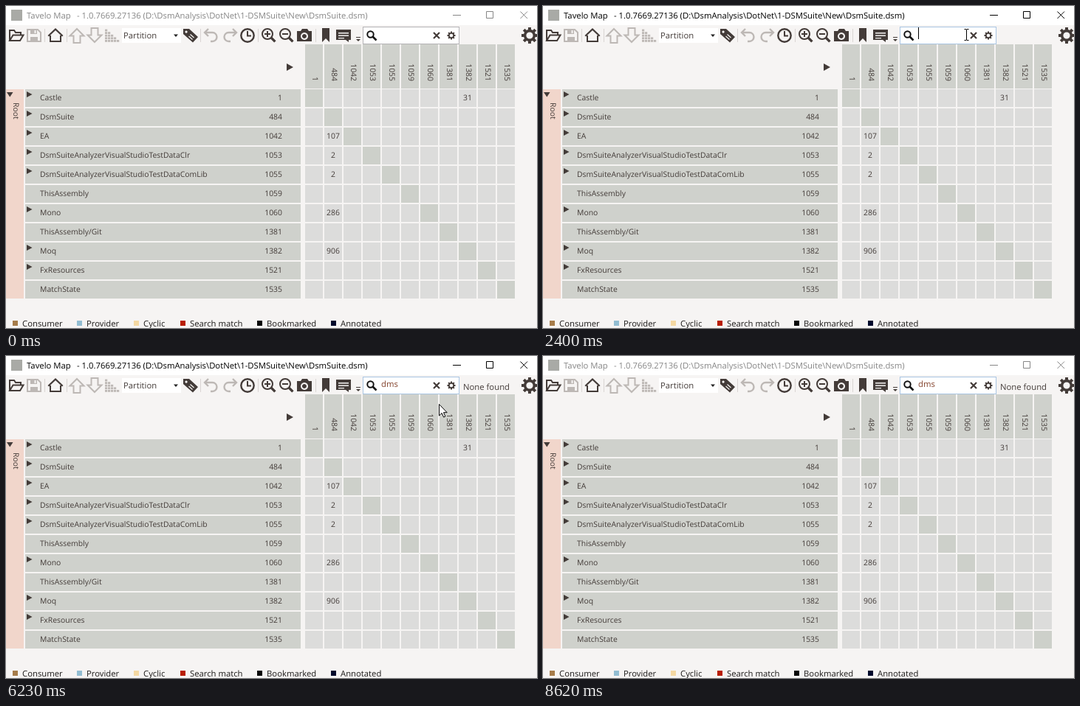
Animation of 719 by 437 pixels, one loop 8.78 s. Source, as an HTML page with a canvas:

```html
<!DOCTYPE html>
<html lang="en">
<head>
<meta charset="utf-8">
<title>Dependency matrix search</title>
<style>
html, body { margin: 0; width: 100%; height: 100%; overflow: hidden; background: #f6f4f3; }
canvas { display: block; }
</style>
</head>
<body>
<canvas id="stage" width="719" height="437"></canvas>
<script>
const ctx = document.getElementById('stage').getContext('2d');
ctx.textRendering = 'geometricPrecision';

const LOOP = 8780;
const INK = '#433b38', FADED = '#bdb8b5', BG = '#f6f4f3';
const BAND = '#cfd1cc', BAND_LIT = '#d9dbd5', CELL = '#dcdcdb', CELL_LIT = '#e4e4e2';
const DIAG = '#cdd0ca', DIAG_LIT = '#d5dad0';
const BIG = 11.3, SMALL = 10.4;
const PITCH = 26, SIZE = 24, LEFT = 405, TOP = 113;

// name, id, expandable
const rows = [
  ['Castle', 1, 1], ['DsmSuite', 484, 1], ['EA', 1042, 1],
  ['DsmSuiteAnalyzerVisualStudioTestDataClr', 1053, 1],
  ['DsmSuiteAnalyzerVisualStudioTestDataComLib', 1055, 1],
  ['ThisAssembly', 1059, 0], ['Mono', 1060, 1], ['ThisAssembly/Git', 1381, 0],
  ['Moq', 1382, 1], ['FxResources', 1521, 1], ['MatchState', 1535, 0]
];
// row, column, weight
const links = [[0, 8, 31], [2, 1, 107], [3, 1, 2], [4, 1, 2], [6, 1, 286], [8, 1, 906]];
const legend = [
  [9, 'Consumer', '#a67c4a'], [96, 'Provider', '#92bdd2'], [173, 'Cyclic', '#f4d8a2'],
  [236, 'Search match', '#b81d00'], [340, 'Bookmarked', '#080808'], [440, 'Annotated', '#000a2c']
];

// start, query, caret x, status, marked rows
const searches = [
  [0, '', 508, '', []],
  [2780, 'd', 515, '', []],
  [2870, 'd', 515, '1019 found', [0, 1, 2, 3, 4, 6, 8]],
  [3270, 'dm', 515, '8 found', [0, 6, 8]],
  [3340, 'dm', 525, '8 found', [0, 6, 8]],
  [3480, 'dms', 530, 'None found', []]
];
const caretFlips = [1390, 1940, 2400, 4050, 4510, 5060, 5610, 6140, 6690, 7230, 7690, 8240];

// Pointer moves: sampling step, end, keys of time, x, y
const moves = [
  { step: 75.7, end: 2780, keys: [
    [230, 662, 426], [420, 606, 300], [600, 535, 160], [760, 486, 67], [920, 490, 55],
    [1062, 503, 44], [1365, 523, 41], [1515, 523, 41], [1668, 573, 39]] },
  { step: 68.3, end: 6820, keys: [
    [6140, 573, 39], [6345, 611, 118], [6550, 671, 281], [6755, 679, 394]] }
];

function rect(x, y, w, h, color) {
  ctx.fillStyle = color;
  ctx.fillRect(x, y, w, h);
}

function text(str, x, y, size = BIG, color = INK, align = 'left') {
  ctx.font = `${size}px "Open Sans", "Noto Sans", sans-serif`;
  ctx.fillStyle = color;
  ctx.textAlign = align;
  ctx.fillText(str, x, y);
}

function turned(str, x, y, align) {
  ctx.save();
  ctx.translate(x, y);
  ctx.rotate(Math.PI / 2);
  text(str, 0, 0, SMALL, INK, align);
  ctx.restore();
}

function fill(d, color = INK, x = 0, y = 0) {
  ctx.save();
  ctx.translate(x, y);
  ctx.fillStyle = color;
  ctx.fill(new Path2D(d), 'evenodd');
  ctx.restore();
}

function line(d, color = INK, width = 2, x = 0, y = 0) {
  ctx.save();
  ctx.translate(x, y);
  ctx.strokeStyle = color;
  ctx.lineWidth = width;
  ctx.stroke(new Path2D(d));
  ctx.restore();
}

function ring(x, y, r, width, color = INK) {
  ctx.beginPath();
  ctx.arc(x, y, r, 0, 7);
  ctx.strokeStyle = color;
  ctx.lineWidth = width;
  ctx.stroke();
}

function gear(x, y, r) {
  ring(x, y, r * .58, r * .32);
  for (let i = 0; i < 8; i++) {
    ctx.save();
    ctx.translate(x, y);
    ctx.rotate(i * Math.PI / 4);
    rect(-r * .18, -r, r * .36, r * .35, INK);
    ctx.restore();
  }
}

function lens(x, y, r, sign) {
  ring(x, y, r, 2);
  line(`M${x + r * .7} ${y + r * .7}l5.5 5.5`, INK, 3.4);
  if (sign) line(`M${x - 4} ${y}h8`, INK, 2);
  if (sign === '+') line(`M${x} ${y - 4}v8`, INK, 2);
}

function titleBar(active) {
  const color = active ? '#000' : '#868686';
  rect(0, 0, 719, 26, '#fff');
  rect(7, 5, 15, 15, '#a9aaa6');
  text('Tavelo Map', 28, 17, BIG, color);
  text('- 1.0.7669.27136 (D:\\DsmAnalysis\\DotNet\\1-DSMSuite\\New\\DsmSuite.dsm)', 96, 17, BIG, color);
  line('M605 12.5h11M650.5 7.5h9v9h-9zM696.5 7.5l9.5 9.5M706 7.5l-9.5 9.5', color, 1);
}

function toolbar() {
  for (const x of [52, 82, 263, 341, 419]) rect(x, 31, 1, 18, '#d9d5d3');

  line('M5 47V33h6l2 3h7v3.500M5 47l4.500-7.500h14L19 47z', INK, 2);
  line('M29 32h14l4 4v12H29z', FADED, 2);
  fill('M33 32h9v6h-9zM33 42h10v6H33zM38.500 33v4h2v-4z', FADED);
  fill('M67 30l10.500 10-1.500 1.500L67 33l-9 8.500L56.500 40z');
  line('M60 40v8h14v-8', INK, 2);
  const up = 'M0-10l9.500 9.500h-5V9h-9V-.5h-5z';
  line(up, FADED, 2, 96, 41);
  ctx.save();
  ctx.scale(1, -1);
  line(up, FADED, 2, 120, -39);
  ctx.restore();
  for (let i = 0; i < 5; i++)
    for (let y = 46; y >= 31 + i * 3.4; y -= 3.6) rect(134 + i * 4, y, 3.2, 2.8, FADED);

  rect(157, 30, 80, 20, '#fff');
  text('Partition', 159, 44);
  fill('M227 38.500h6l-3 3.500z', '#222');
  fill('M240 31h8l12 11-7 7.500-13-11.500zM244 33.500a1.600 1.600 0 1 0 .1 0z');
  line('M249.500 38.500l5 4.500M247.500 41l5 4.500', BG, 1.2);

  const undo = 'M-1 8h2.500a6 6 0 0 0 0-12h-9M-4-9l-5 5 5 5';
  line(undo, FADED, 2.4, 278, 40);
  ctx.save();
  ctx.scale(-1, 1);
  line(undo, FADED, 2.4, -303, 40);
  ctx.restore();
  ring(327, 40, 8.7, 2.4);
  line('M327 34v6.500h5', INK, 2);
  lens(354, 38, 7, '+');
  lens(378, 38, 7, '-');
  fill('M394 34h5l2-3h7l2 3h4v14h-20zM404 36a5 5 0 1 0 .1 0zM404 38a3 3 0 1 1-.1 0z');
  fill('M428 30h10v19l-5-5-5 5z');
  fill('M447 32h20v14h-3v3l-4-3h-13zM450 36v1.500h14V36zM450 39.500V41h14v-1.500zM450 43v1.200h8V43z');
  rect(474, 42, 6, 1, INK);
  fill('M474 45h6l-3 3z');
  gear(709, 40, 11);
}

function searchBox(state, focused, caret) {
  rect(483, 28, 131, 24, focused ? '#a9c5e2' : '#b4b3b6');
  rect(484, 29, 129, 22, '#fff');
  ring(493.500, 38.500, 4.2, 2, '#111');
  line('M496.500 41.500l5 5', '#111', 2.6);
  line('M579 36l8 8M587 36l-8 8', INK, 2.2);
  gear(603, 40, 5.5);
  const [, query, caretX, status] = state;
  text(query, 508, 42, BIG, status === 'None found' ? '#85452f' : INK);
  if (caret) rect(caretX, 29, 1, 16, '#000');
  text(status, 619, 46);
}

function matrix(marked, litRow, litCol) {
  fill('M380 78l9 5-9 5z');
  rect(0, TOP, SIZE, 284, '#f1d6cb');
  fill('M1 117h8.500l-4.250 6.500z');
  turned('Root', 10, 131, 'left');

  rows.forEach(([name, id, expands], i) => {
    const y = TOP + i * PITCH, x = LEFT + i * PITCH;
    rect(26, y, 373, SIZE, i === litRow ? BAND_LIT : BAND);
    if (expands) fill('M0 0l7.500 4-7.500 4z', INK, 28, y + 3);
    text(name, 46, y + 15, SMALL);
    text(id, 374, y + 15, SMALL, INK, 'right');
    if (marked.includes(i)) rect(393, y, 5, SIZE, '#f40000');

    rect(x, 52, SIZE, 60, i === litCol ? BAND_LIT : BAND);
    turned(id, x + 10, 102, 'right');
    for (let c = 0; c < rows.length; c++) {
      const lit = i === litRow || c === litCol;
      const color = c === i ? (lit ? DIAG_LIT : DIAG) : (lit ? CELL_LIT : CELL);
      rect(LEFT + c * PITCH, y, SIZE, SIZE, color);
    }
  });
  for (const [r, c, n] of links)
    text(n, LEFT + c * PITCH + 12, TOP + r * PITCH + 15, SMALL, INK, 'center');
}

function pointerAt(t) {
  const move = moves.find(m => t >= m.keys[0][0] && t < m.end);
  if (!move) return null;
  const { keys, step } = move, t0 = keys[0][0];
  const s = t0 + Math.floor((t - t0) / step + .01) * step;
  const n = keys.findIndex(k => k[0] > s);
  if (n < 0) return keys[keys.length - 1].slice(1);
  const [a, b] = [keys[n - 1], keys[n]];
  const f = (s - a[0]) / (b[0] - a[0]);
  return [a[1] + (b[1] - a[1]) * f, a[2] + (b[2] - a[2]) * f].map(Math.round);
}

function drawPointer([x, y]) {
  if (x > 504 && x < 577 && y > 28 && y < 52) {
    line('M-3-7.500h2.500l.5.500.5-.5H3M0-7V7M-3 7.500h2.500L0 7l.5.500H3', '#000', 1, x + .5, y);
    return;
  }
  const arrow = 'M.5.500v15.500l3.600-3.500 2.500 5.500 2.300-1-2.400-5.300h4.700z';
  fill(arrow, '#fff', x, y);
  line(arrow, '#000', 1, x, y);
}

function draw(t) {
  const active = t >= 1390 && t < 8620;
  const state = searches.filter(s => s[0] <= t).pop();
  const flips = caretFlips.filter(f => f <= t).length;
  const typing = t >= 2780 && t < 4050;
  const caret = typing || flips % 2 === 1;
  const pointer = pointerAt(t);

  let litRow = -1, litCol = -1;
  if (pointer && !active) {
    const [x, y] = pointer;
    if (x >= LEFT && y >= 52 && y < 397) litCol = Math.floor((x - LEFT) / PITCH);
    if (litCol >= 0 && y >= TOP) litRow = Math.floor((y - TOP) / PITCH);
  }

  rect(0, 0, 719, 437, BG);
  titleBar(active);
  toolbar();
  searchBox(state, t >= 1160, caret);
  matrix(state[4], litRow, litCol);
  for (const [x, label, color] of legend) {
    rect(x, 427, 7, 7, color);
    text(label, x + 13, 435, BIG, '#1c1a19');
  }
  if (pointer) drawPointer(pointer);
}

function tick() {
  draw(performance.now() % LOOP);
  requestAnimationFrame(tick);
}
tick();
</script>
</body>
</html>
```
